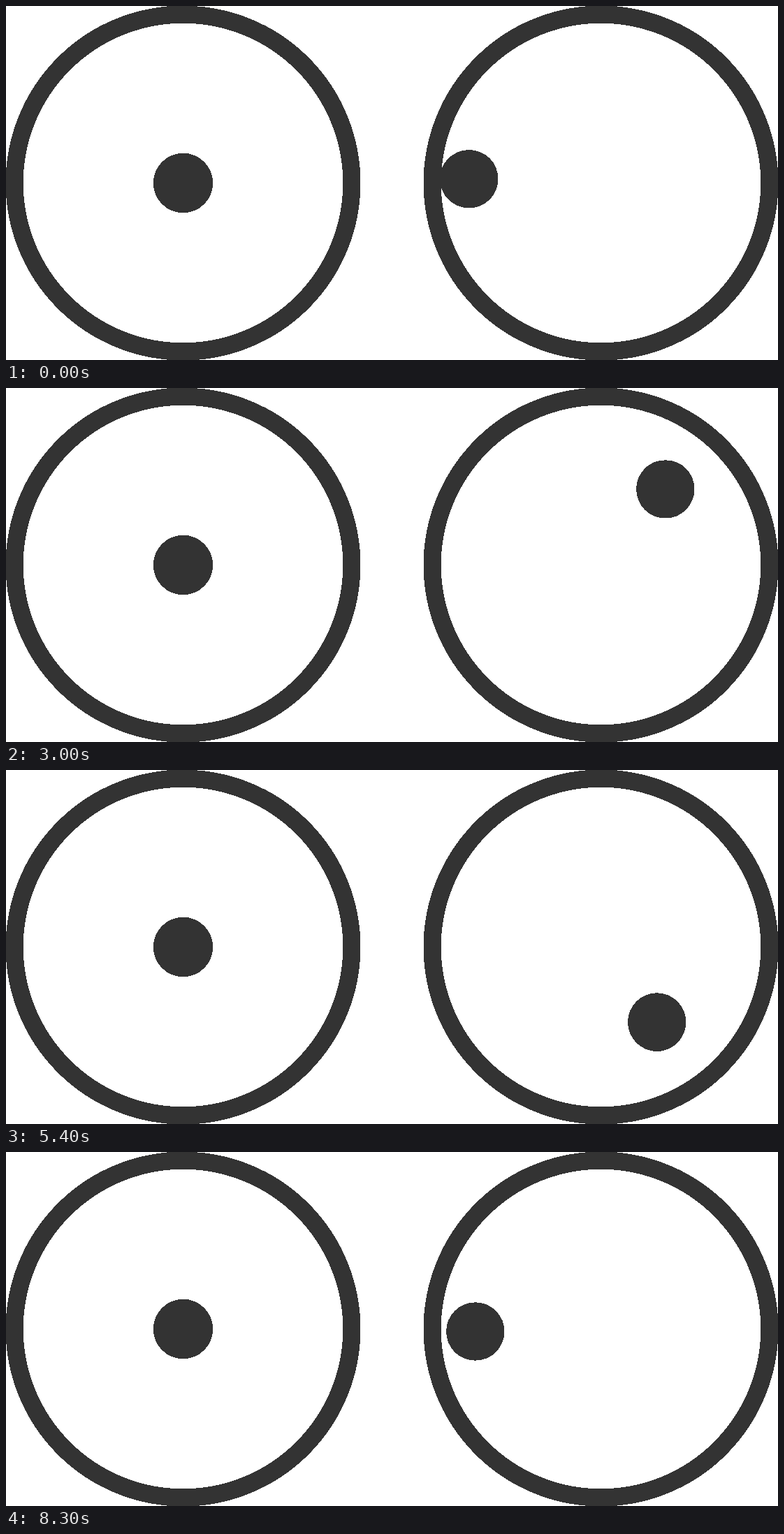
Animation of 1105x507 px, one loop 8400 ms. Source, as an HTML page:

```html
<!DOCTYPE html>
<html lang="en">
<head>
<meta charset="utf-8">
<title>Bouncing dot</title>
<style>
  html, body { margin: 0; width: 100%; height: 100%; overflow: hidden; background: #fff; }
  svg { display: block; width: 1105px; height: 507px; }
  .ring { fill: none; stroke: #333; stroke-width: 24.2; }
  .dot { fill: #333; }
</style>
</head>
<body>
<svg viewBox="0 0 1105 507">
  <!-- Hard edges: every touched pixel becomes solid. -->
  <filter id="hard" filterUnits="userSpaceOnUse" x="0" y="0" width="1105" height="507" color-interpolation-filters="sRGB">
    <feComponentTransfer>
      <feFuncR type="linear" slope="0" intercept="0.2"/>
      <feFuncG type="linear" slope="0" intercept="0.2"/>
      <feFuncB type="linear" slope="0" intercept="0.2"/>
      <feFuncA type="linear" slope="40"/>
    </feComponentTransfer>
  </filter>
  <g filter="url(#hard)">
    <circle class="ring" cx="253.5" cy="253.5" r="241.4"/>
    <circle class="dot" cx="253.5" cy="253.5" r="42.2"/>
    <circle class="ring" cx="851.5" cy="253.5" r="241.4"/>
    <circle class="dot" id="ball" r="41.2"/>
  </g>
</svg>
<script>
  const LOOP = 8400, STEP = 100;
  // Bounce points on the ring, visited at equal intervals.
  const bounces = [[662.8, 247.7], [872, 65.6], [1039.5, 250.5], [850.8, 444]];
  const leg = LOOP / bounces.length;
  const ball = document.getElementById('ball');
  const mix = (a, b, k) => a + (b - a) * k;

  function draw(ms) {
    const t = Math.floor((ms % LOOP) / STEP) * STEP;
    const i = Math.floor(t / leg);
    const k = t / leg - i;
    const from = bounces[i], to = bounces[(i + 1) % bounces.length];
    ball.setAttribute('cx', mix(from[0], to[0], k));
    ball.setAttribute('cy', mix(from[1], to[1], k));
  }

  const start = performance.now();
  function tick() {
    draw(performance.now() - start);
    requestAnimationFrame(tick);
  }
  tick();
</script>
</body>
</html>
```
